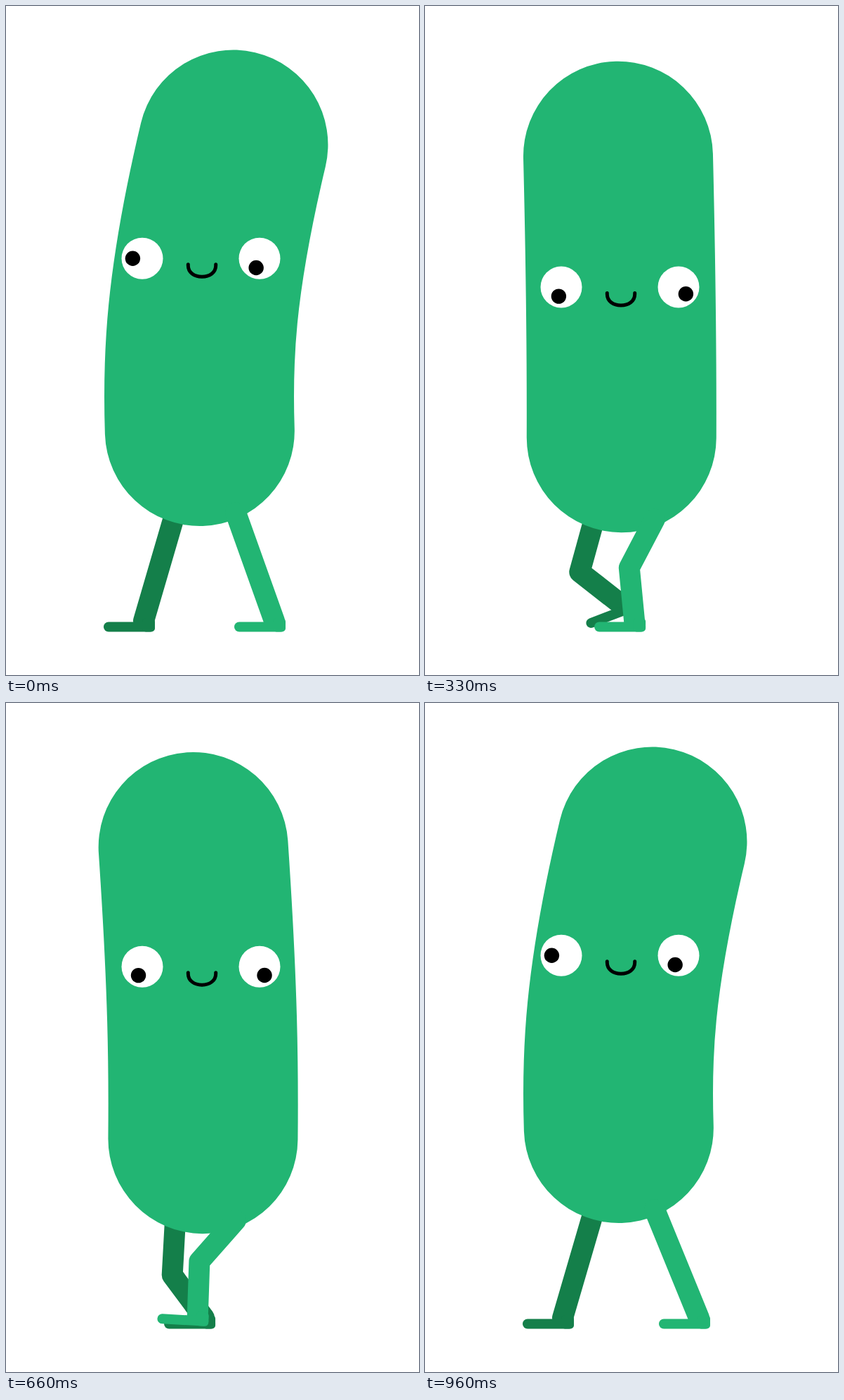
These frames come from a looping animation (588x952 px, 990 ms). An HTML page:

```html
<!DOCTYPE html>
<html lang="en">
<head>
<meta charset="utf-8">
<title>Walking pickle</title>
<style>
  html, body { margin: 0; width: 100%; height: 100%; overflow: hidden; background: #fff; }
  svg { display: block; width: 588px; height: 952px; }
  .body, .leg, .foot, .mouth { fill: none; stroke-linecap: round; stroke-linejoin: round; }
  .body { stroke: #22b573; stroke-width: 270; }
  .leg { stroke-width: 30; }
  .foot { stroke-width: 14; }
  .far { stroke: #147f4a; }
  .far rect { fill: #147f4a; }
  .near { stroke: #22b573; }
  .near rect { fill: #22b573; }
  rect { stroke: none; }
  .mouth { stroke: #000; stroke-width: 5; }
  .white { fill: #fff; }
</style>
</head>
<body>
<svg viewBox="0 0 588 952">
  <g class="far" id="far">
    <path class="leg"/>
    <g><path class="foot" d="M-50 8.5H9"/><rect x="-2" y="-4" width="18" height="19.5" rx="5"/></g>
  </g>
  <path class="body" id="body"/>
  <g class="near" id="near">
    <path class="leg"/>
    <g><path class="foot" d="M-50 8.5H9"/><rect x="-2" y="-4" width="18" height="19.5" rx="5"/></g>
  </g>
  <g id="face">
    <circle class="white" cx="194" r="29.5"/>
    <circle class="white" cx="361" r="29.5"/>
    <circle id="pupilL" r="10.7"/>
    <circle id="pupilR" r="10.7"/>
    <path class="mouth" d="M259.3 8.5V10C259.3 20 268 26 279 26S298.7 20 298.7 10V8.5"/>
  </g>
</svg>
<script>
const STEP = 30, STEPS = 33, CYCLE = 32, STRIDE = 16, HALF = 8;
const THIGH = 78, SHIN = 76, RADIUS = 135, GROUND = 875;
const { PI, sin, cos } = Math;
const $ = id => document.getElementById(id);

const ease = u => u * u * (3 - 2 * u);
const mix = (a, b, u) => a + (b - a) * u;
const turn = t => 2 * PI * t / CYCLE;

// Eased value per cycle: a at time ta, b at time tb, then back to a.
function swing(t, ta, a, tb, b) {
  const u = (t - ta + CYCLE) % CYCLE, d = tb - ta;
  return u < d ? mix(a, b, ease(u / d)) : mix(b, a, ease((u - d) / (CYCLE - d)));
}

// Two hops per cycle, the second one higher by the skew.
const bob = (t, low, rise, skew) =>
  low - (rise - skew * cos(turn(t))) * (1 + cos(2 * turn(t))) / 2;

const bottom = t => bob(t, 760, 29.5, 9.5);
const height = t => 677.5 - 8.3 * sin(turn(t));
const faceY = t => bob(t - 1.75, 403.5, 57.5, 8);

const legs = [
  { el: $("far"), hip: 241, front: 196, rear: 298, drift: 0, lift: 20, delay: 0 },
  { el: $("near"), hip: 327, front: 258, rear: 382, drift: 0.25, lift: 14, delay: HALF }
];

// The foot slides back on the ground, then swings forward through the air.
function footPose({ front, rear, drift, lift, delay }, t) {
  const p = (t + delay) % STRIDE, back = rear + drift * t;
  if (p < HALF) return { x: mix(front, back, ease(p / HALF)), y: GROUND, tilt: 0 };
  const s = p / HALF - 1, vigour = sin(turn(t)), force = 1 + 0.4 * vigour;
  const arc = sin(PI * s) ** 2;
  return {
    x: mix(back, front, ease(s ** (1.1 + 0.3 * vigour))),
    y: GROUND - lift * force * arc,
    tilt: -10 * force * (sin(2 * PI * s) + arc)
  };
}

function drawLeg(leg, t) {
  const { x, y, tilt } = footPose(leg, t);
  const hy = bottom(t) - 19, dx = x - leg.hip, dy = y - hy, d = Math.hypot(dx, dy);
  // Knee from two bones; a leg that is out of reach stretches straight.
  const bent = d < THIGH + SHIN;
  const along = bent ? (d * d + THIGH ** 2 - SHIN ** 2) / (2 * d) : d / 2;
  const out = bent ? Math.sqrt(THIGH ** 2 - along ** 2) : 0;
  const kx = leg.hip + (dx * along - dy * out) / d;
  const ky = hy + (dy * along + dx * out) / d;
  const [bone, foot] = leg.el.children;
  bone.setAttribute("d", `M${leg.hip} ${hy}L${kx} ${ky}L${x} ${y}`);
  foot.setAttribute("transform", `translate(${x} ${y}) rotate(${tilt})`);
}

function drawBody(t) {
  const bend = swing(t, 2.3, 51.5, 16.5, -33), x = 279.4 - 0.075 * bend;
  const low = bottom(t) - RADIUS, high = bottom(t) - height(t) + RADIUS;
  $("body").setAttribute("d", `M${x} ${low}C${x - 0.07 * bend} ${mix(low, high, 0.25)}`
    + ` ${x} ${mix(high, low, 0.49)} ${x + bend} ${high}`);
}

function drawPupil(el, cx, r, degrees) {
  const a = degrees * PI / 180;
  el.setAttribute("cx", cx + r * cos(a));
  el.setAttribute("cy", r * sin(a));
}

function draw() {
  const t = Math.floor(performance.now() / STEP + 0.02) % STEPS;
  drawBody(t);
  legs.forEach(leg => drawLeg(leg, t));
  $("face").setAttribute("transform", `translate(0 ${faceY(t)})`);
  drawPupil($("pupilL"), 194, 13.6, swing(t, 0, 180, 16, 83));
  drawPupil($("pupilR"), 361, 14.2, swing(t, 0, 110, 14.8, 30));
  requestAnimationFrame(draw);
}
draw();
</script>
</body>
</html>
```
